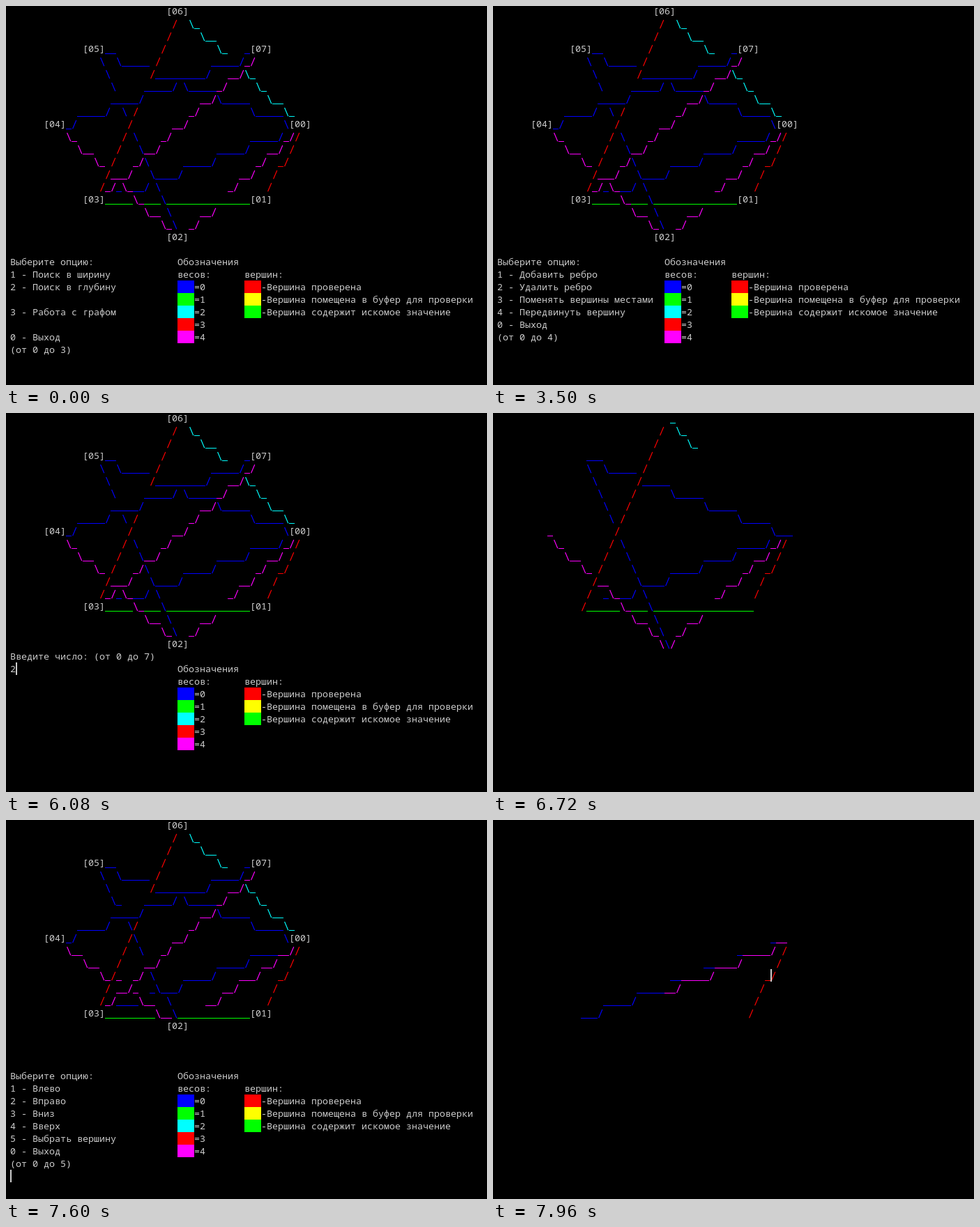
An HTML page with a canvas for the animation above (7990 ms loop, 690x544 px).

```html
<!DOCTYPE html>
<html lang="ru">
<head>
<meta charset="utf-8">
<style>
html, body { margin: 0; width: 100%; height: 100%; overflow: hidden; background: #000; }
canvas { display: block; }
</style>
</head>
<body>
<canvas id="stage" width="690" height="544"></canvas>
<script>
const ctx = document.getElementById('stage').getContext('2d');
const LOOP = 7990, CELL_W = 8, CELL_H = 18;
const TEXT = '#ccc';
const WEIGHTS = ['#00f', '#0f0', '#0ff', '#f00', '#f0f'];
const cellX = col => 6 + col * CELL_W;
const cellY = row => row * CELL_H - 2;

const VERTICES = [[52, 9], [45, 15], [30, 18], [15, 15], [8, 9], [15, 3], [30, 0], [45, 3]];
// upper vertex, lower vertex, weight; later edges overwrite earlier ones
const EDGES = [
  [0, 3, 0], [0, 2, 4], [0, 1, 3], [3, 1, 1], [4, 2, 4], [5, 2, 0],
  [5, 0, 0], [6, 3, 3], [6, 0, 2], [7, 4, 0], [7, 3, 4]
];

const MENUS = {
  main: [20, 'Выберите опцию:', '1 - Поиск в ширину', '2 - Поиск в глубину', '',
    '3 - Работа с графом', '', '0 - Выход', '(от 0 до 3)', ''],
  graph: [20, 'Выберите опцию:', '1 - Добавить ребро', '2 - Удалить ребро',
    '3 - Поменять вершины местами', '4 - Передвинуть вершину', '0 - Выход', '(от 0 до 4)', ''],
  number: [19, 'Введите число: (от 0 до 7)', ''],
  move: [20, 'Выберите опцию:', '1 - Влево', '2 - Вправо', '3 - Вниз', '4 - Вверх',
    '5 - Выбрать вершину', '0 - Выход', '(от 0 до 5)', '']
};

function drawText(col, row, text) {
  ctx.fillStyle = TEXT;
  [...text].forEach((ch, i) => ctx.fillText(ch, cellX(col + i), cellY(row) + 14));
}

function drawBlock(col, row, width, color) {
  ctx.fillStyle = color;
  ctx.fillRect(cellX(col), cellY(row), width * CELL_W, CELL_H);
}

function drawCursor(col, row) {
  ctx.fillStyle = TEXT;
  ctx.fillRect(cellX(col), cellY(row), 2, CELL_H);
}

function drawStroke(col, row, glyph, color) {
  const x = cellX(col), y = cellY(row);
  drawBlock(col, row, 1, '#000');
  if (glyph === '_') {
    ctx.fillStyle = color;
    ctx.fillRect(x, y + 16, CELL_W, 1);
    return;
  }
  const [low, high] = glyph === '/' ? [1.6, 6.8] : [6.8, 1.6];
  ctx.strokeStyle = color;
  ctx.lineWidth = 1.15;
  ctx.beginPath();
  ctx.moveTo(x + low, y + 16.2);
  ctx.lineTo(x + high, y + 4);
  ctx.stroke();
}

// Integer line stepping by column; returns the cells still left to draw.
function drawEdge([x0, y0], [x1, y1], color, budget) {
  const dx = Math.abs(x1 - x0), dy = y1 - y0, dir = Math.sign(x1 - x0);
  const bias = dx - 1 - (dx >> 1);
  let last = 0;
  for (let d = 1; d <= dx && budget > 0; d++, budget--) {
    const drop = Math.floor((dy * d + bias) / dx);
    const glyph = drop === last ? '_' : dir < 0 ? '/' : '\\';
    drawStroke(x0 + dir * d, y0 + drop, glyph, color);
    last = drop;
  }
  return budget;
}

function drawGraph(row, budget) {
  const points = VERTICES.map(([x, y], i) => [x, i === 2 ? row : y]);
  for (const [a, b, weight] of EDGES) {
    budget = drawEdge(points[a], points[b], WEIGHTS[weight], budget);
  }
  if (budget <= 0) return;
  points.forEach(([x, y], i) => {
    drawBlock(x - 2, y, 4, '#000');
    drawText(x - 2, y, `[0${i}]`);
  });
}

function drawLegend() {
  drawText(30, 20, 'Обозначения');
  drawText(30, 21, 'весов:');
  drawText(42, 21, 'вершин:');
  WEIGHTS.forEach((color, i) => {
    drawBlock(30, 22 + i, 3, color);
    drawText(33, 22 + i, '=' + i);
  });
  [['#f00', 'проверена'], ['#ff0', 'помещена в буфер для проверки'],
    ['#0f0', 'содержит искомое значение']].forEach(([color, text], i) => {
    drawBlock(42, 22 + i, 3, color);
    drawText(45, 22 + i, '-Вершина ' + text);
  });
}

const fullView = (menu, cursorOn, row = 18, typed = '') => () => {
  drawGraph(row, Infinity);
  drawLegend();
  const [first, ...lines] = MENUS[menu];
  lines.forEach((line, i) => drawText(0, first + i, line));
  const inputRow = first + lines.length - 1;
  drawText(0, inputRow, typed);
  if (cursorOn) drawCursor(typed.length, inputRow);
};

const partialView = (row, cells, cursorCol, cursorRow) => () => {
  drawGraph(row, cells);
  if (cursorCol) drawCursor(cursorCol, cursorRow);
};

const redraw = (start, middle, end, menu, row) => [
  [start, partialView(row, 55, 33, 16)],
  [middle, partialView(row, 190)],
  [end, fullView(menu, true, row)]
];

const TIMELINE = [
  [0, fullView('main', false)],
  [240, fullView('main', true)],
  [770, fullView('main', false)],
  [1300, fullView('main', true)],
  [1830, fullView('main', false)],
  [2350, fullView('main', true)],
  [2870, fullView('main', false)],
  [2890, fullView('main', true, 18, '3')],
  ...redraw(2920, 2950, 2980, 'graph', 18),
  [3500, fullView('graph', false)],
  [4030, fullView('graph', true)],
  [4530, fullView('graph', false)],
  ...redraw(4680, 4700, 4730, 'number', 18),
  [5250, fullView('number', false)],
  [5780, fullView('number', true)],
  [6080, fullView('number', true, 18, '2')],
  [6610, fullView('number', false, 18, '2')],
  ...redraw(6690, 6720, 6750, 'move', 18),
  [7240, fullView('move', false)],
  ...redraw(7420, 7440, 7470, 'move', 17),
  ...redraw(7550, 7570, 7600, 'move', 16),
  ...redraw(7680, 7710, 7740, 'move', 15),
  ...redraw(7820, 7850, 7880, 'move', 14),
  [7960, partialView(13, 66, 49, 12)]
];

const begin = performance.now();

function tick() {
  const t = (performance.now() - begin) % LOOP;
  ctx.fillStyle = '#000';
  ctx.fillRect(0, 0, 690, 544);
  ctx.font = '13.333px "Noto Sans Mono", "DejaVu Sans Mono", monospace';
  TIMELINE.findLast(([time]) => time <= t)[1]();
  requestAnimationFrame(tick);
}
tick();
</script>
</body>
</html>
```
